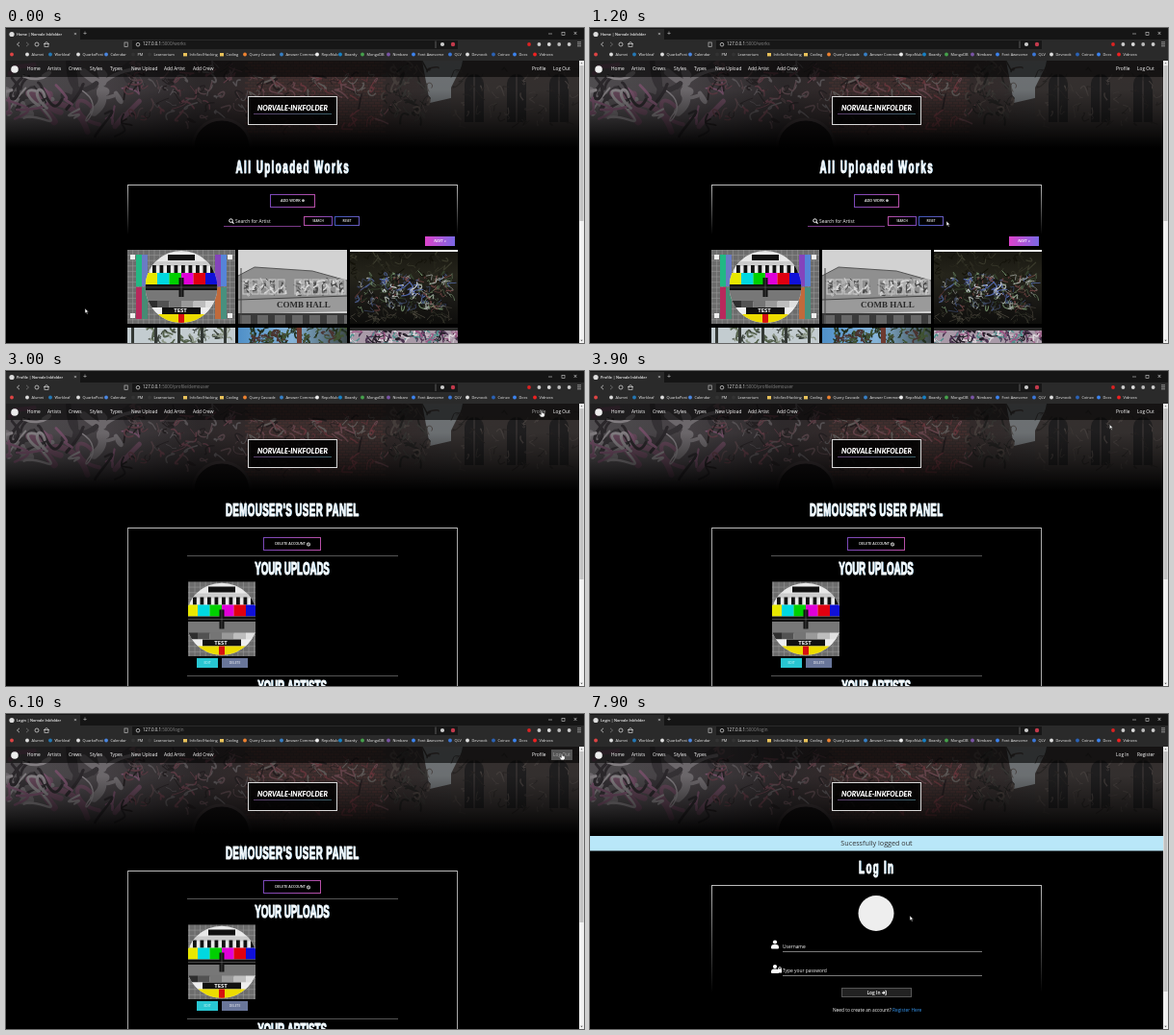
These frames come from a looping animation (600x328 px, 8 s). An HTML page with a canvas:

```html
<!DOCTYPE html>
<html lang="en">
<head>
<meta charset="utf-8">
<title>Uploaded works</title>
<style>
html, body { margin: 0; width: 100%; height: 100%; overflow: hidden; background: #000; }
canvas { display: block; width: 600px; height: 328px; }
</style>
</head>
<body>
<canvas id="stage" width="600" height="328"></canvas>
<script>
const g = document.getElementById('stage').getContext('2d');
const SANS = '"Open Sans", "Noto Sans", sans-serif';
const SITE = 'Norvale Inkfolder';
const LOOP = 8000, STEP = 100;

// cursor tip: time, x, y
const PATH = [
  [0, 82, 292], [1200, 370, 201], [2000, 517, 129], [2600, 556, 41], [3700, 556, 41],
  [4800, 464, 121], [5400, 577, 41], [6300, 577, 41], [7100, 352, 248], [7900, 332, 210]
];

let seed = 1;
const rnd = (a = 1, b = 0) => {
  seed = (seed * 16807) % 2147483647;
  return b + (a - b) * seed / 2147483647;
};

function box(x, y, w, h, fill) {
  g.fillStyle = fill;
  g.fillRect(x, y, w, h);
}
function frame(x, y, w, h, color, lw = 1) {
  g.strokeStyle = color;
  g.lineWidth = lw;
  g.strokeRect(x, y, w, h);
}
function dot(x, y, r, fill) {
  g.fillStyle = fill;
  g.beginPath();
  g.arc(x, y, r, 0, 7);
  g.fill();
}
function poly(fill, ...p) {
  g.fillStyle = fill;
  g.beginPath();
  for (let i = 0; i < p.length; i += 2) g.lineTo(p[i], p[i + 1]);
  g.closePath();
  g.fill();
}
function line(color, lw, ...p) {
  g.strokeStyle = color;
  g.lineWidth = lw;
  g.beginPath();
  for (let i = 0; i < p.length; i += 2) g.lineTo(p[i], p[i + 1]);
  g.stroke();
}
function ring(x, y, r, color, lw = .7) {
  g.strokeStyle = color;
  g.lineWidth = lw;
  g.beginPath();
  g.arc(x, y, r, 0, 7);
  g.stroke();
}
function text(s, x, y, size = 4.8, color = '#fff', align = 'left', style = '', family = SANS) {
  g.font = `${style} ${size}px ${family}`;
  g.fillStyle = color;
  g.textAlign = align;
  g.textBaseline = 'middle';
  g.fillText(s, x, y);
}
function fade(x0, y0, x1, y1, ...stops) {
  const f = g.createLinearGradient(x0, y0, x1, y1);
  stops.forEach((c, i) => f.addColorStop(i / (stops.length - 1), c));
  return f;
}
function clipped(x, y, w, h, draw) {
  g.save();
  g.beginPath();
  g.rect(x, y, w, h);
  g.clip();
  draw();
  g.restore();
}
function scribble(x, y, w, h, n, colors, lw, size = 20) {
  g.lineCap = 'round';
  for (let i = 0; i < n; i++) {
    const px = x + rnd(w), py = y + rnd(h);
    const d = () => rnd(size, -size);
    g.strokeStyle = colors[i % colors.length];
    g.lineWidth = lw * rnd(1.3, .5);
    g.beginPath();
    g.moveTo(px, py);
    g.bezierCurveTo(px + d(), py + d(), px + d(), py + d(), px + d(), py + d());
    g.stroke();
  }
  g.lineCap = 'butt';
}

// tall, heavy display face with a faint blue edge
function heading(s, y, spacing) {
  const narrow = .52;
  g.save();
  g.translate(297, y);
  g.scale(narrow, 1);
  g.letterSpacing = spacing / narrow + 'px';
  g.shadowColor = 'rgba(90,180,232,.6)';
  g.shadowOffsetX = .7;
  text(s, spacing, 0, 18.5, '#f4fbff', 'center', 'bold', '"Liberation Sans", Arial, sans-serif');
  g.shadowColor = 'transparent';
  g.strokeStyle = '#f4fbff';
  g.lineWidth = 1.2;
  g.strokeText(s, spacing, 0);
  g.restore();
}
function button(x, y, w, h, label, colors, size) {
  frame(x, y, w, h, fade(x, y, x + w, y + h, ...colors));
  text(label, x + w / 2, y + h / 2 + .3, size, '#fff', 'center', '600');
}

function tabStrip(title, path) {
  box(0, 0, 600, 12, '#151515');
  box(0, 1, 77, 11, '#2a2a2a');
  dot(6, 6.5, 2.6, '#ddd');
  text(`${title} | ${SITE}`, 11, 6.8, 3.8, '#f4f4f4', 'left', '600');
  text('×', 72, 6.5, 6, '#ddd', 'center');
  text('+', 82, 6.5, 7, '#ccc', 'center');
  line('#ccc', .6, 563, 6, 567, 6);
  frame(577, 4.5, 3, 3, '#ccc', .6);
  text('×', 591, 6, 7, '#ddd', 'center');
  box(0, 12, 600, 22, '#2a2a2a');
  line('#ccc', .8, 14, 14.8, 11.5, 17, 14, 19.2);
  line('#777', .8, 21, 14.8, 23.5, 17, 21, 19.2);
  ring(32, 17, 2, '#ccc', .8);
  frame(40, 16.5, 4, 3, '#ccc', .7);
  line('#ccc', .8, 39, 17, 42, 14.5, 45, 17);
  box(131, 13, 338, 9, '#171717');
  frame(123, 15, 3.2, 4.4, '#bbb', .7);
  ring(137, 17.2, 1.8, '#ccc', .8);
  text('127.0.0.1', 142, 17.3, 4.5, '#eee');
  text(path, 142 + g.measureText('127.0.0.1').width, 17.3, 4.5, '#858585');
  line('#777', .7, 446, 13.5, 446, 21);
  dot(453, 17, 2.1, '#ccc');
  dot(464, 17, 2.2, '#c33a4c');
  ['#d22', '#ccc', '#ddd', '#bbb', '#ccc'].forEach((c, i) => dot(543 + i * 10.4, 17, 1.9, c));
  for (let i = -1; i < 2; i++) box(593, 16.5 + i * 2, 4, .7, '#bbb');
}

function bookmarks() {
  const items = [
    [6, '', '#d44'], [22, 'Alumni', '#ddd'], [46, 'Workleaf', '#2478b5'], [75, 'QuarkoPost', '#ddd'],
    [104, 'Calendar', '#4b86e0'], [132, 'PM', '#333'], [149, 'Learnorium', '#333'],
    [186, 'InfoSec/Hacking', '#e9c25a'], [224, 'Coding', '#e9c25a'], [248, 'Query Cascade', '#ee8230'],
    [286, 'Answer Commons', '#377fc4'], [323, 'RepoNub', '#eee'], [347, 'Boardy', '#1681c5'],
    [370, 'MongoDB', '#45a04b'], [397, 'Nimbaro', '#7954a5'], [423, 'Font Awesome', '#3c83ee'],
    [461, 'QLV', '#3b77d8'], [479, 'Devnook', '#ddd'], [506, 'Coinzo', '#2b62b5'],
    [528, 'Docs', '#3c83ee'], [549, 'Vidnora', '#f02020']
  ];
  for (const [x, label, color] of items) {
    if (label === 'InfoSec/Hacking' || label === 'Coding') box(x - 2, 26, 4, 3.4, color);
    else dot(x, 27.5, 1.9, color);
    text(label, x + 4.5, 27.8, 3.9, '#eee');
  }
}

function banner() {
  seed = 41;
  clipped(0, 34, 595, 91, () => {
    box(0, 34, 595, 91, fade(0, 0, 595, 0, '#575457', '#4c474b', '#322d2f', '#3b2f2f', '#372e2e', '#383737', '#2c2a2a'));
    // large letters on the left wall
    scribble(0, 46, 125, 50, 16, ['#777276', '#3a363a', '#6e4e62'], 7, 32);
    scribble(0, 46, 125, 50, 22, ['#8e898d', '#2f2b2f', '#7d5670'], 2.5, 26);
    scribble(125, 36, 120, 62, 90, ['#5d4a4f', '#272224', '#5e595c', '#64404a'], 1.5, 11);
    // brick wall
    for (let y = 35; y < 110; y += 3)
      for (let x = 248 + y % 2 * 3; x < 392; x += 6)
        box(x, y, 5.2, 2.3, `rgba(${90 + rnd(40) | 0},65,60,.25)`);
    scribble(250, 50, 140, 52, 100, ['#6d4a51', '#272022', '#66615f', '#6d3a40'], 1.4, 10);
    g.fillStyle = '#151213';
    g.beginPath();
    g.ellipse(224, 124, 30, 29, 0, 0, 7);
    g.fill();
    g.strokeStyle = '#40383a';
    g.lineWidth = 3;
    g.stroke();
    // street, sky and trees
    poly('#777b7e', 432, 34, 474, 34, 466, 72, 440, 78);
    scribble(390, 40, 52, 52, 60, ['#242322', '#3a3836', '#4b4340'], 1.6, 10);
    // church
    poly('#393433', 462, 125, 462, 62, 476, 34, 595, 34, 595, 125);
    for (let x = 476; x < 595; x += 44) {
      box(x, 58, 20, 40, '#222122');
      dot(x + 10, 58, 10, '#222122');
      line('#4a4543', 1, x + 10, 48, x + 10, 98);
    }
    scribble(464, 40, 131, 60, 60, ['#2a2726', '#494341'], 1, 8);
    box(0, 34, 595, 91, fade(0, 34, 0, 125, 'rgba(0,0,0,.08)', 'rgba(0,0,0,.1)', 'rgba(0,0,0,.5)', '#000'));
  });
  box(0, 34, 595, 17, 'rgba(0,0,0,.6)');
  box(251, 71, 93, 30, 'rgba(0,0,0,.85)');
  frame(251.5, 71.5, 92, 29, '#d8d8d8');
  text('NORVALE-INKFOLDER', 297.5, 84, 7.3, '#fff', 'center', 'italic 900', 'Lato, sans-serif');
  line(fade(257, 0, 338, 0, '#7e5896', '#4f8490'), .7, 257, 89.5, 338, 89.5);
}

function nav(loggedIn, mx, my) {
  dot(9, 43, 3.8, '#eee');
  const left = [['Home', 22], ['Artists', 43], ['Crews', 65], ['Styles', 87], ['Types', 108]];
  if (loggedIn) left.push(['New Upload', 130], ['Add Artist', 164], ['Add Crew', 194]);
  const right = loggedIn ? [['Profile', 546, 561], ['Log Out', 568, 587]] : [['Log In', 546, 561], ['Register', 568, 587]];
  left.forEach(([s, x]) => text(s, x, 42.8, 4.8));
  right.forEach(([s, x, end], i) => {
    const over = mx >= x - 2 && mx <= end && my > 34 && my < 51;
    if (over && i) box(x - 2, 37, end - x + 3, 11, '#555');
    text(s, x, 42.8, 4.8, over ? '#aaa' : '#fff');
  });
}

function panel(y, bottom, solid) {
  const edge = solid ? '#aaa' : fade(0, y, 0, bottom, '#bbb', 'rgba(190,190,190,0)');
  box(126, y, 343, 1, '#bbb');
  box(126, y, 1, bottom - y, edge);
  box(468, y, 1, bottom - y, edge);
}

// test card of 112 x 77 centred on cx, cropped to width w
function testCard(cx, y, w, h) {
  clipped(cx - w / 2, y, w, h, () => {
    const x = cx - 56, cy = y + h / 2, r = 37.5;
    box(x, y, 112, h, '#6c6c6c');
    for (let i = 0; i <= 112; i += 5.6) line('#989898', .6, x + i, y, x + i, y + h);
    for (let i = 0; i <= h; i += 5.6) line('#989898', .6, x, y + i, x + 112, y + i);
    [[9, '#22b884', '#b8285c'], [15, '#6a7cc4', '#478a74'], [91, '#8444bc', '#c06a3c'], [97, '#5684d8', '#47907e']].forEach(([dx, a, b]) => {
      box(x + dx, y + 5, 6, 33, a);
      box(x + dx, y + 39, 6, 33, b);
    });
    [3, 104].forEach(dx => [5, 66].forEach(dy => box(x + dx, y + dy, 5, 5, '#eee')));
    g.save();
    g.beginPath();
    g.arc(cx, cy, r, 0, 7);
    g.clip();
    box(cx - r, y, 75, h, '#e8e8e8');
    box(cx - 14, y + 5, 28, 6, '#111');
    box(cx - r, y + 12, 75, 5, '#ccc');
    for (let i = 0; i < 10; i++) box(cx - r + i * 7.5, y + 16, 3.8, 8, '#111');
    ['#e8e800', '#00d8e0', '#00d000', '#e000d8', '#e00010', '#1010d8'].forEach((c, i) =>
      box(cx - r + i * 12.5, y + 24, 12.6, 12, c));
    box(cx - r, y + 36, 75, 6, '#111');
    box(cx - r, y + 42, 75, 12, '#777');
    for (let i = 0; i < 6; i++) box(cx - r + i * 12.5, y + 53, 12.6, 7, `hsl(0 0% ${18 + i * 14}%)`);
    box(cx - 2.5, y + 29, 5, 20, '#111');
    line('#777', .5, cx - r, y + 39, cx + r, y + 39);
    line('#777', .5, cx, y + 29, cx, y + 49);
    box(cx - r, y + 60, 75, 8, '#eee');
    box(cx - 20, y + 60, 40, 7, '#111');
    text('TEST', cx - 1, y + 63.8, 6, '#fff', 'center', 'bold');
    box(cx - r, y + 67, 75, 11, '#ecdc00');
    box(cx - 3, y + 67, 6, 11, '#d81010');
    g.restore();
  });
}

function shopPhoto() {
  seed = 77;
  clipped(241, 231, 113, 77, () => {
    box(241, 231, 113, 77, '#d2d2d2');
    poly('#8f8f8f', 241, 258, 258, 249, 318, 253, 354, 263, 354, 288, 241, 284);
    line('#555', 1, 241, 258, 258, 249, 318, 253, 354, 263);
    for (let x = 246; x < 348; x += 9) {
      if (x === 291) continue;
      scribble(x + 1, 264, 6, 13, 9, ['#4a4a4a', '#dadada'], 1.3, 5);
      frame(x, 262, 7, 15, '#c4c4c4', 1.2);
    }
    // shop sign above the windows
    poly('#9a9a9a', 241, 283, 354, 279, 354, 295, 241, 298);
    line('#444', 1, 241, 283, 354, 279);
    text('COMB HALL', 309, 288.5, 9, '#2a2a2a', 'center', 'bold', '"Liberation Serif", Times, serif');
    box(241, 297, 113, 11, '#3a3a3a');
    for (let x = 243; x < 354; x += 18) box(x, 299, 11, 9, '#666');
    line('#444', 1, 244, 250, 244, 308);
  });
}

function muralPhoto() {
  seed = 19;
  clipped(357, 231, 112, 77, () => {
    box(357, 231, 112, 77, fade(0, 231, 0, 308, '#17160f', '#25241b', '#1b1a16', '#0d0d0b'));
    scribble(357, 234, 112, 28, 60, ['#2c2b20', '#121109', '#3a3a2c'], 1, 8);
    scribble(363, 257, 100, 35, 210, ['#6f8a68', '#131313', '#a5aaa4', '#4a5a86', '#33402c', '#7c4a4a'], .9, 7);
    scribble(390, 263, 40, 20, 35, ['#c9cfd2', '#5266a8', '#151515'], 1.1, 7);
    scribble(357, 294, 112, 12, 40, ['#35362c', '#4a463c'], .8, 8);
    box(357, 231, 112, 2, '#eee');
  });
}

function lowerPhotos() {
  seed = 8;
  clipped(126, 312, 112, 16, () => {
    box(126, 312, 112, 16, '#c3ccd0');
    scribble(146, 312, 92, 16, 50, ['#53604b', '#8a9484', '#383f38'], 1.6, 7);
    for (let x = 130; x < 238; x += 24) box(x, 312, 3, 16, '#333834');
  });
  clipped(241, 312, 113, 16, () => {
    box(241, 312, 113, 16, fade(241, 0, 354, 0, '#4f90c8', '#86b4d8', '#3e4a4c'));
    scribble(252, 312, 102, 16, 80, ['#23301f', '#3f5232', '#4a3430'], 1.6, 8);
    box(302, 312, 5, 16, '#6e3a30');
  });
  clipped(357, 312, 112, 16, () => {
    box(357, 312, 112, 16, '#a99aa8');
    scribble(357, 314, 112, 14, 100, ['#ded6dc', '#4a3350', '#9c5684', '#4f8f8c', '#221c26'], 1.4, 8);
    box(357, 312, 112, 3, '#2a2a2a');
  });
}

function worksPage() {
  heading('All Uploaded Works', 146, 1.55);
  panel(163, 215);
  button(274.5, 173.5, 46, 13, 'ADD WORK ⊕', ['#7a48b8', '#b850a8'], 3.9);
  ring(233.5, 200.6, 1.8, '#fff', 1);
  line('#fff', 1.1, 234.8, 202, 236.5, 203.7);
  text('Search for Artist', 238, 201.3, 4.9);
  box(226, 206, 80, 1, '#7a3a88');
  button(309.5, 196.5, 29, 9, 'SEARCH', ['#b850a8', '#7a48b8'], 3.1);
  button(341.5, 196.5, 25, 9, 'RESET', ['#3e58b8', '#6a5cc0'], 3.1);
  box(435, 217, 31, 10, fade(435, 0, 466, 0, '#dc43cb', '#7a68e4'));
  text('NEXT »', 450.5, 222.2, 4, '#fff', 'center', 'italic 600');
  testCard(182, 231, 112, 77);
  shopPhoto();
  muralPhoto();
  lowerPhotos();
}

function profilePage() {
  heading("DEMOUSER'S USER PANEL", 146, .5);
  panel(163, 328, true);
  button(267.5, 173.5, 59, 13, 'DELETE ACCOUNT    ', ['#7a48b8', '#b850a8'], 3.7);
  ring(314, 180.5, 1.6, '#fff', .8);
  line('#fff', .7, 312.9, 179.4, 315.1, 181.6);
  box(188, 192, 219, 1, '#555');
  heading('YOUR UPLOADS', 207, 0);
  testCard(224, 219.5, 70, 77.5);
  box(198, 299, 22, 10, '#28c7d3');
  text('EDIT', 209, 304.2, 3.3, '#e9ffff', 'center');
  box(224, 299, 27, 10, '#69769a');
  text('DELETE', 237.5, 304.2, 3.3, '#fff', 'center');
  box(188, 317, 219, 1, '#555');
  heading('YOUR ARTISTS', 330, 0);
}

function person(x, y) {
  dot(x, y - 2.5, 2.1, '#fff');
  g.beginPath();
  g.roundRect(x - 4, y, 8, 4.5, [3, 3, 1, 1]);
  g.fill();
}

function loginPage() {
  box(0, 125, 595, 203, '#000');
  box(0, 127, 595, 15.5, '#b9e7f9');
  text('Sucessfully logged out', 297.5, 135, 7.2, '#333', 'center');
  heading('Log In', 161, 1.4);
  panel(178, 290);
  dot(297, 207.5, 18.5, '#eee');
  person(192, 240);
  text('Username', 200, 242.3, 4.9);
  box(200, 247, 207, .8, '#999');
  person(192, 265.5);
  box(195, 265.5, 4, 4, '#fff');
  ring(197, 265, 1.4, '#fff', .8);
  text('Type your password', 200, 267.5, 4.9);
  box(200, 272, 207, .8, '#999');
  box(261, 285.5, 73, 9.5, '#222');
  frame(261.5, 285.5, 72, 9, '#555');
  text('Log In', 294.5, 290.3, 4.8, '#fff', 'center', '600');
  line('#fff', 1, 303, 290.3, 306, 290.3);
  poly('#fff', 304.5, 288.3, 306.8, 290.3, 304.5, 292.3);
  line('#fff', .7, 306, 288.2, 307.5, 288.2, 307.5, 292.4, 306, 292.4);
  const ask = 'Need to create an account? ', link = 'Register Here';
  text(ask, 252, 309, 4.8);
  text(link, 252 + g.measureText(ask).width, 309, 4.8, '#3595ee');
}

function scrollbar(thumb) {
  box(595, 34, 5, 294, '#f1f1f1');
  box(595.5, 39, 4, thumb, '#c1c1c1');
  poly('#777', 596.3, 37.3, 597.5, 35.7, 598.7, 37.3);
  poly('#555', 596.3, 324.7, 597.5, 326.3, 598.7, 324.7);
}

function cursorAt(t) {
  const i = PATH.findIndex(p => p[0] > t);
  if (i < 0) return PATH.at(-1).slice(1);
  const [t0, x0, y0] = PATH[i - 1], [t1, x1, y1] = PATH[i], k = (t - t0) / (t1 - t0);
  return [x0 + (x1 - x0) * k, y0 + (y1 - y0) * k];
}

function pointer(x, y) {
  g.save();
  g.translate(x, y);
  g.strokeStyle = '#222';
  g.lineWidth = .6;
  if (x > 545 && y < 50) {
    poly('#fff', -.7, 0, .6, 0, .8, 2.5, 3.4, 3.2, 3.2, 5.5, 2.3, 7, -.8, 7, -2.6, 4.4, -2, 3.6, -.7, 4.4);
  } else {
    poly('#fff', 0, 0, 0, 5, 1.2, 4, 2.1, 6, 3, 5.6, 2.1, 3.7, 3.6, 3.6);
  }
  g.stroke();
  g.restore();
}

function draw(t) {
  const [mx, my] = cursorAt(t);
  const page = t < 2800 ? 0 : t < 6200 ? 1 : 2;
  box(0, 0, 600, 328, '#000');
  if (t < 2700) tabStrip('Home', ':5000/works');
  else if (t < 6100) tabStrip('Profile', ':5000/profile/demouser');
  else tabStrip('Login', ':5000/login');
  bookmarks();
  banner();
  nav(page < 2, mx, my);
  [worksPage, profilePage, loginPage][page]();
  scrollbar([162, 178, 250][page]);
  pointer(mx, my);
}

let last = -1;
function tick() {
  const t = Math.floor(performance.now() % LOOP / STEP) * STEP;
  if (t !== last) draw(last = t);
  requestAnimationFrame(tick);
}
tick();
</script>
</body>
</html>
```
